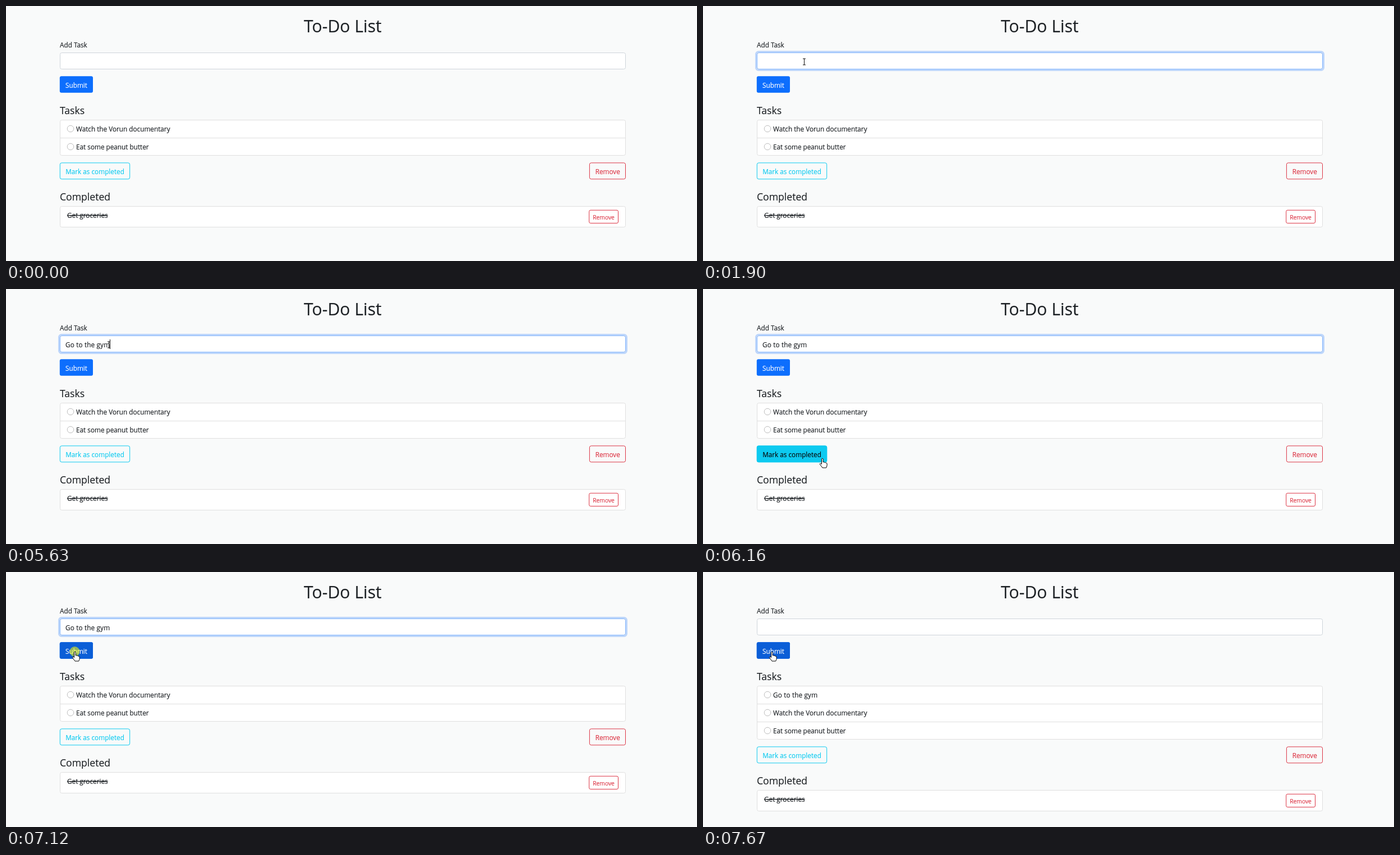
An HTML page that plays this animation: 1232x455 px, repeating every 8000 ms.

```html
<!DOCTYPE html>
<html lang="en">
<head>
<meta charset="utf-8">
<title>To-Do List</title>
<style>
  html, body { margin: 0; width: 100%; height: 100%; overflow: hidden; background: #f9fafa; }
  svg { display: block; width: 1232px; height: 455px; }
  text { font: 11.75px "Open Sans", "Noto Sans", sans-serif; fill: #1c2024; stroke: #1c2024; stroke-width: .15px; white-space: pre; }
  .h1 { font-size: 30.15px; text-anchor: middle; }
  .h4 { font-size: 17.6px; }
  .wide { letter-spacing: .15px; }
  .mid { text-anchor: middle; }
  .small { font-size: 10.3px; }
  .done { text-decoration: line-through; }
  .card { fill: #fff; stroke: #dfdfdf; }
  .info { fill: none; stroke: #0dcaf0; }
  text.info { fill: #0dcaf0; }
  .danger { fill: none; stroke: #dc3545; }
  text.danger { fill: #dc3545; }
  .radio { fill: #fff; stroke: #bfbfbf; }
</style>
</head>
<body>
<svg viewBox="0 0 1232 455">
  <text class="h1" x="600.3" y="47">To-Do List</text>
  <text x="96" y="74">Add Task</text>
  <rect x="96.5" y="83.5" width="1008" height="29" rx="3" fill="#fff" stroke="#ced4da"/>
  <g id="focus" fill="none">
    <rect x="94.5" y="81.5" width="1012" height="33" rx="4.5" stroke="#bdd6fb" stroke-width="3"/>
    <rect x="96.5" y="83.5" width="1008" height="29" rx="3" stroke="#86b7fe"/>
  </g>
  <text id="entry" class="wide" x="106" y="104"></text>
  <rect id="caret" y="90" width="1" height="17" fill="#111"/>

  <rect id="ring" x="94.3" y="123.8" width="62.2" height="32.5" rx="4.5" fill="none" stroke="#95bffc" stroke-width="3"/>
  <rect x="95.8" y="125.3" width="59.2" height="29.5" rx="3" fill="#0d6efd"/>
  <rect id="submit" x="95.8" y="125.3" width="59.2" height="29.5" rx="3" fill="#0b5ed7"/>
  <text class="mid" x="125.5" y="146" style="fill:#fff;stroke:#fff">Submit</text>

  <text class="h4" x="96" y="193">Tasks</text>
  <rect id="list" class="card" x="96.5" y="203.5" width="1008" height="63" rx="3"/>
  <g id="added">
    <circle class="radio" cx="115" cy="219" r="5.8"/>
    <text class="wide" x="125" y="224">Go to the gym</text>
    <path class="card" d="M97 235.5H1104"/>
  </g>
  <g id="rest">
    <circle class="radio" cx="115" cy="219" r="5.8"/>
    <text x="125" y="224">Watch the Vorun documentary</text>
    <path class="card" d="M97 235.5H1104"/>
    <circle class="radio" cx="115" cy="251" r="5.8"/>
    <text x="125" y="256">Eat some peanut butter</text>

    <rect class="info" x="96.3" y="279.9" width="124.4" height="28.9" rx="3"/>
    <text class="info mid" x="158.5" y="300">Mark as completed</text>
    <g id="mark">
      <rect x="95.8" y="279.4" width="125.4" height="29.9" rx="3" fill="#0dcaf0"/>
      <text class="mid" x="158.5" y="300" style="fill:#000">Mark as completed</text>
    </g>
    <rect class="danger" x="1040.4" y="279.9" width="64.1" height="28.9" rx="3"/>
    <text class="danger mid" x="1072.8" y="300">Remove</text>

    <text class="h4" x="96" y="347">Completed</text>
    <rect class="card" x="96.5" y="357.5" width="1008" height="37" rx="3"/>
    <text class="done" x="109" y="378">Get groceries</text>
    <rect class="danger" x="1039.7" y="364.3" width="51.8" height="23.2" rx="2.5"/>
    <text class="danger mid small" x="1065.5" y="381">Remove</text>
  </g>

  <circle id="click" r="9" fill="#ff0" opacity=".55"/>
  <g id="pointer">
    <path id="arrow" fill="#fff" stroke="#000" d="M0 0V14.5l3.4-3.2 2.2 5 2-.9-2.2-4.9H10z"/>
    <path id="beam" fill="none" stroke="#111" d="M-2.5-5.5h5M0-5.5v11M-2.5 5.5h5"/>
    <path id="hand" fill="#fff" stroke="#000" transform="translate(-.7 1)" d="M-1.3 10V1.2a1.3 1.3 0 0 1 2.6 0V6.5c1.5-.6 2.3-.3 2.6.6 1.3-.5 2.2-.1 2.4.8 1.3-.2 2 .3 2 1.6V12c0 2-1 3-1.4 4.5H.2C-.8 14.5-3 12.5-4.2 10.6c-.9-1.5.8-2.4 1.9-1.3z"/>
  </g>
</svg>
<script>
const LOOP = 8000, BLINK = 530, TASK = "Go to the gym";
const FOCUS = 1370, PRESS = 7120, SAVED = 7460;

// Pointer path: time, x, y
const path = [
  [530, 982, 419], [670, 860, 370], [950, 380, 180], [1160, 190, 106],
  [1230, 174, 99], [1300, 178, 100], [1750, 178, 100], [1860, 180, 100],
  [5530, 180, 100], [5600, 183, 100], [5740, 196, 150], [5950, 213, 290],
  [6090, 217, 304], [6230, 210, 300], [6300, 185, 268], [6370, 158, 222],
  [6440, 136, 187], [6580, 125, 158], [6650, 123, 142]
];

const el = id => document.getElementById(id);
const show = (id, on) => el(id).style.display = on ? "" : "none";
const within = (t, a, b) => t >= a && t < b;
const clamp = v => Math.max(0, Math.min(1, v));

// 150 ms style transition in at a and out at b
const fade = (t, a, b) => clamp((t - a) / 150) * (1 - clamp((t - b) / 150));

function pointerAt(t) {
  const phase = t < 5000 ? 40 : 0;
  const s = Math.floor((t - phase) / 70) * 70 + phase;
  const i = path.findIndex(p => p[0] > s);
  if (i < 0) return path[path.length - 1].slice(1);
  if (i === 0) return path[0].slice(1);
  const [t0, x0, y0] = path[i - 1], [t1, x1, y1] = path[i];
  const k = (s - t0) / (t1 - t0);
  return [x0 + (x1 - x0) * k, y0 + (y1 - y0) * k];
}

function shapeAt(x, y) {
  const inside = (l, t, r, b) => x >= l && x <= r && y >= t && y <= b;
  if (inside(96, 83, 1105, 113) || inside(96, 177, 140, 197)) return "beam";
  if (inside(96, 125, 155, 155) || inside(96, 280, 221, 310)) return "hand";
  return "arrow";
}

function typedCount(t) {
  if (t < 3760 || t >= SAVED) return 0;
  if (t < 4090) return 1;
  if (t < 5090) return Math.min(11, 2 + Math.floor((t - 4090) / 88.8));
  return t < 5160 ? 12 : 13;
}

function caretOn(t) {
  if (!within(t, FOCUS, PRESS)) return false;
  if (within(t, 3760, 5230)) return !within(t, 4090, 4150);
  const start = t < 3760 ? FOCUS : 5230;
  return Math.floor((t - start) / BLINK) % 2 === 0;
}

function draw(t) {
  const saved = t >= SAVED;
  const entry = el("entry");
  entry.textContent = TASK.slice(0, typedCount(t));
  el("caret").setAttribute("x", Math.round(106 + entry.getComputedTextLength()));
  show("caret", caretOn(t));

  el("focus").style.opacity = fade(t, FOCUS - 40, PRESS);
  el("ring").style.opacity = saved ? 0 : clamp((t - PRESS) / 150);
  el("submit").style.opacity = clamp((t - 6620) / 150);
  el("mark").style.opacity = fade(t, 5920, 6300);

  show("added", saved);
  el("list").setAttribute("height", saved ? 95 : 63);
  el("rest").setAttribute("transform", `translate(0 ${saved ? 32 : 0})`);

  const [x, y] = pointerAt(t);
  const shape = shapeAt(x, y);
  for (const s of ["arrow", "beam", "hand"]) show(s, s === shape);
  show("pointer", t >= 530);
  el("pointer").setAttribute("transform", `translate(${Math.floor(x) + .5} ${Math.floor(y) - .5})`);
  show("click", within(t, FOCUS, FOCUS + 200) || within(t, PRESS, PRESS + 200));
  el("click").setAttribute("cx", x - .5);
  el("click").setAttribute("cy", y);
}

const start = performance.now();
function tick() {
  draw((performance.now() - start) % LOOP);
  requestAnimationFrame(tick);
}
tick();
</script>
</body>
</html>
```
